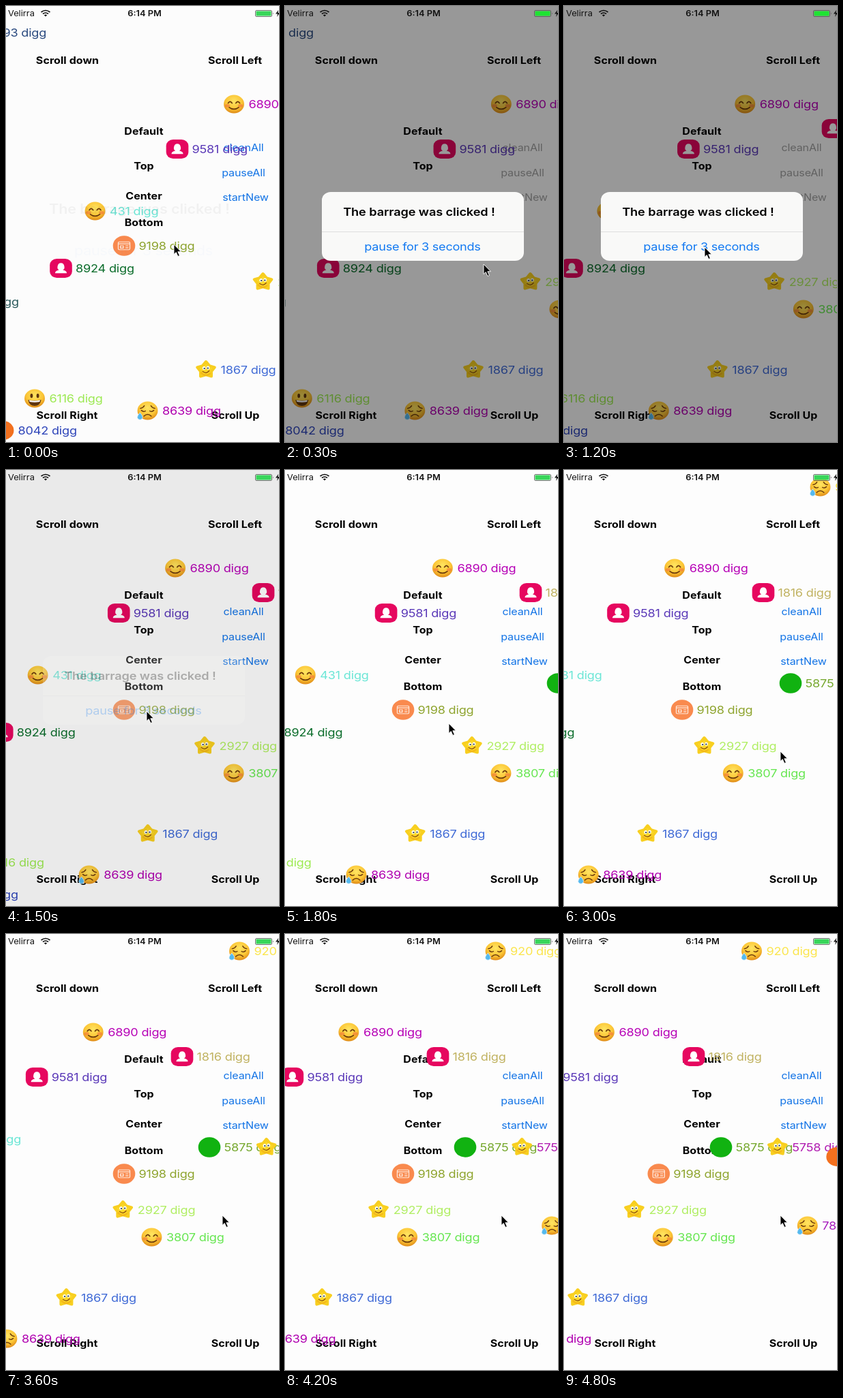
An HTML page that plays this animation: 400 by 640 pixels, repeating every 5100 ms.

```html
<!DOCTYPE html>
<html lang="en">
<head>
<meta charset="utf-8">
<title>Barrage demo</title>
<style>
html, body { margin: 0; width: 100%; height: 100%; overflow: hidden; background: #fdfdfd; }
svg { display: block; width: 400px; height: 640px; }
text { font-family: Inter, Roboto, sans-serif; }
.digg { font-size: 17px; letter-spacing: -.2px; }
.ok { font-size: 17px; letter-spacing: -.25px; }
.title { font-size: 17px; font-weight: 600; letter-spacing: -.08px; }
.label { font-size: 15px; font-weight: 700; letter-spacing: .07px; }
.link { font-size: 15px; letter-spacing: -.08px; fill: #1173e6; }
.dimmed .link { fill: #a0a0a0; }
.status { font-size: 12px; fill: #111; }
</style>
</head>
<body>
<svg viewBox="0 0 400 640">
  <defs>
    <radialGradient id="skin" cx=".5" cy=".35" r=".68">
      <stop offset="0" stop-color="#ffe562"/>
      <stop offset=".6" stop-color="#fcc636"/>
      <stop offset="1" stop-color="#dc8414"/>
    </radialGradient>
    <g id="face"><circle r="14" fill="url(#skin)"/></g>
    <g id="smile">
      <use href="#face"/>
      <g fill="#f27a3c" opacity=".65"><ellipse cx="-9" cy="2.5" rx="3.4" ry="2.5"/><ellipse cx="9" cy="2.5" rx="3.4" ry="2.5"/></g>
      <path d="M-8-1.5q2.7-4.5 5.4 0M2.6-1.5q2.7-4.5 5.4 0M-6.5 5q6.5 5.5 13 0" fill="none" stroke="#6b3a0c" stroke-width="1.7" stroke-linecap="round"/>
    </g>
    <g id="grin">
      <use href="#face"/>
      <g fill="#5e340e"><ellipse cx="-4.3" cy="-4" rx="1.8" ry="3.2"/><ellipse cx="4.3" cy="-4" rx="1.8" ry="3.2"/><path d="M-9 2q9 2.6 18 0q-1.5 9.5-9 9.5t-9-9.5z"/></g>
      <path d="M-7.8 2.7q7.8 2 15.6 0l-1 2.6q-6.8 1.5-13.6 0z" fill="#fff"/>
    </g>
    <g id="sad">
      <use href="#face"/>
      <path d="M-10-3.500q4-.8 5.500-4M10-3.500q-4-.8-5.500-4M-8.500-.5q2.500 3 5.500 1M8.500-.5q-2.500 3-5.500 1M-5 8.300q5-5 10 0" fill="none" stroke="#6b3a0c" stroke-width="1.500" stroke-linecap="round"/>
      <path d="M-10.500 3q4.200 5 3.600 8q-1 2.800-3.600 2.800t-3.600-2.800q-.6-3 3.600-8z" fill="#55b9ee" stroke="#e4f6ff" stroke-width=".7"/>
    </g>
    <g id="star">
      <path id="starBody" fill="#fcd929" stroke="#f8cf20" stroke-width="4" stroke-linejoin="round"/>
      <path d="M-7 4q7 8 13 1" fill="none" stroke="#f0a818" stroke-width="2.500" opacity=".6"/>
      <g fill="#fff"><ellipse cx="-2.600" cy="-2.500" rx="2.200" ry="2.700"/><ellipse cx="2.800" cy="-3" rx="2.200" ry="2.700"/></g>
      <g fill="#345"><circle cx="-2.200" cy="-2" r="1.200"/><circle cx="2.600" cy="-2.500" r="1.200"/></g>
      <path d="M-4.500 2.500q5 4.500 9-1" fill="none" stroke="#8a4a10" stroke-width="1.300" stroke-linecap="round"/>
    </g>
    <g id="user">
      <rect x="-15.300" y="-14.500" width="30.600" height="29" rx="9.500" fill="#e6075f"/>
      <path d="M-8 7.500q0-3.800 5.300-4.800Q-5.500 1.200-4.600-3q.6-5 4.600-5t4.600 5Q5.500 1.200 2.700 2.700Q8 3.700 8 7.500z" fill="#fff"/>
    </g>
    <g id="card">
      <circle r="15.300" fill="#f98a4e"/>
      <g fill="none" stroke="#ffe9dc" stroke-width="1.200"><rect x="-8" y="-6" width="16" height="12" rx="1.500"/><path d="M-8-3h16M-5 0h4v3.500h-4zM2 0h4M2 3h4"/></g>
    </g>
    <g id="green"><circle r="15.300" fill="#11b211"/></g>
    <g id="orange"><circle r="14.500" fill="#f3701e"/></g>
  </defs>

  <rect width="400" height="640" fill="#fdfdfd"/>
  <g id="page"></g>
  <g id="items"></g>
  <rect id="dim" width="400" height="640"/>

  <g id="statusBar">
    <g fill="none" stroke="#111" stroke-width="1.700">
      <path d="M51.500 9q6.500-5 13 0M54 11.500q4-3 8 0"/>
    </g>
    <path d="M55.800 13.300q2.200-1.600 4.400 0l-2.200 2.200z" fill="#111"/>
    <rect x="365.500" y="6.500" width="24" height="9" rx="1.500" fill="none" stroke="#555" stroke-width=".8"/>
    <rect id="charge" x="366.500" y="7.500" width="22" height="7" rx=".8"/>
    <path d="M391 9.500q1.500 1.500 0 3z" fill="#555"/>
    <path d="M399 6l-4 5.500h3l-1 4.500 4-6h-2.500z" fill="#111"/>
  </g>

  <g id="alert">
    <g id="panel">
      <rect x="54" y="273" width="296" height="101" rx="13" ry="12" fill="#f9f9f8"/>
      <path d="M54 331.500h296" stroke="#dedede"/>
    </g>
  </g>
  <path id="cursor" d="M0 0v14.500l3.300-3 2.600 6 2.500-1.100-2.600-5.700h4.600z" fill="#000" stroke="#fff" stroke-width=".9"/>
</svg>

<script>
const STEP = 300, LOOP = 5100;
// The phone screen is 375 x 667 points, shown at 400 x 640.
const SCALE = `scale(${400 / 375} ${640 / 667})`;
const $ = id => document.getElementById(id);

function add(parent, tag, attrs, content = '') {
  const el = document.createElementNS('http://www.w3.org/2000/svg', tag);
  for (const key in attrs) el.setAttribute(key, attrs[key]);
  el.textContent = content;
  return parent.appendChild(el);
}
const place = (x, y) => `translate(${x} ${y}) ${SCALE}`;
const write = (parent, cls, x, y, content, anchor = 'middle') =>
  add(parent, 'text', { class: cls, transform: place(x, y), 'text-anchor': anchor }, content);

$('starBody').setAttribute('d', 'M' + Array.from({ length: 10 }, (_, i) => {
  const a = (i * 36 - 90) * Math.PI / 180, r = i % 2 ? 7.8 : 12.5;
  return `${r * Math.cos(a)} ${r * Math.sin(a)}`;
}).join('L') + 'z');

[['Scroll down', 90, 80], ['Scroll Left', 335.5, 80], ['Default', 202, 184], ['Top', 202, 235],
 ['Center', 202, 279], ['Bottom', 202, 318], ['Scroll Right', 89.5, 601], ['Scroll Up', 336, 601]]
  .forEach(([s, x, y]) => write($('page'), 'label', x, y + 5.3, s));
[['cleanAll', 348, 208], ['pauseAll', 348, 245], ['startNew', 351, 281]]
  .forEach(([s, x, y]) => write($('page'), 'link', x, y + 5.3, s));

write($('statusBar'), 'status', 3, 15, 'Velirra', 'start');
write($('statusBar'), 'status', 203, 15, '6:14 PM').setAttribute('font-weight', 600);
const title = write($('alert'), 'title', 196.5, 308, 'The barrage was clicked !');
const ok = write($('alert'), 'ok', 201.5, 359, 'pause for 3 seconds');
ok.setAttribute('fill', '#1279f2');

// icon, count, colour, start x, y, pixels per step, step at which it starts moving
const items = [
  ['', 8793, '#2a4a80', -47, 39, 17.17],
  ['smile', 6890, '#b600b6', 334, 144, 17.19],
  ['user', 9581, '#5a38b8', 251, 210, 17.15],
  ['smile', 431, '#6be6d6', 130.5, 301, 16.78],
  ['card', 9198, '#8ea42e', 173, 352, 17.1, 14],
  ['user', 8924, '#0a6c2a', 80.5, 385, 17.25],
  ['star', 2927, '#b0ee62', 376.5, 405, 17.1],
  ['', 6204, '#2a5a5c', -89, 434, 17.17],
  ['smile', 3807, '#66e650', 419.5, 445, 17.17],
  ['star', 1867, '#3f6ad6', 293, 534, 17.05],
  ['grin', 6116, '#9dea52', 42, 576, 17.17],
  ['sad', 8639, '#b000b0', 207.5, 594, 17.17],
  ['orange', 8042, '#2d44ba', -4, 623, 17.2],
  ['user', 1816, '#c0b260', 462, 180, 17],
  ['sad', 920, '#fbe54c', 543, 25, 16.75],
  ['green', 5875, '#76a82e', 502, 313, 17],
  ['star', 5758, '#b01ab0', 588, 313, 17.2],
  ['sad', 7836, '#a61abc', 631.5, 428, 17.17],
  ['orange', 3412, '#3a8a60', 674.5, 327, 17.17]
].map(([icon, count, fill, x, y, speed, from = 0]) => {
  const el = add($('items'), 'g', {});
  if (icon) add(el, 'use', { href: '#' + icon });
  add(el, 'text', { class: 'digg', x: 20.2, y: 6.2, fill }, count + ' digg');
  return { el, x, y, speed, from };
});

// step, tip x, tip y
const pointer = [[0, 246, 350], [1, 291, 379], [2, 250, 368], [3, 206, 354],
                 [6, 240, 372], [7, 317, 413]];

// dim, panel, title and button opacity, zoom
const shown = [.4, 1, 1, 1, 1], hidden = [0, 0, 0, 0, 1];
const alertAt = n => n === 0 ? [.005, 0, .04, .02, 1.19]
  : n < 5 ? shown
  : n === 5 ? [.075, .2, .28, .28, 1] : hidden;

function draw(n) {
  for (const { el, x, y, speed, from } of items)
    el.setAttribute('transform', place(x - speed * Math.max(0, n - from), y));

  const [dim, panel, titleAlpha, okAlpha, zoom] = alertAt(n);
  $('dim').setAttribute('opacity', dim);
  $('panel').setAttribute('opacity', panel);
  title.setAttribute('opacity', titleAlpha);
  ok.setAttribute('opacity', okAlpha);
  $('alert').setAttribute('transform', `translate(202 324) scale(${zoom}) translate(-202 -324)`);
  $('page').classList.toggle('dimmed', n > 0 && n < 5);
  $('charge').setAttribute('fill', n > 0 && n < 5 ? '#1ee432' : '#38d65a');

  const [, x, y] = pointer.filter(p => p[0] <= n).pop();
  $('cursor').setAttribute('transform', `translate(${x} ${y})`);
}

const start = performance.now();
function tick() {
  draw(Math.floor((performance.now() - start) % LOOP / STEP));
  requestAnimationFrame(tick);
}
tick();
</script>
</body>
</html>
```
